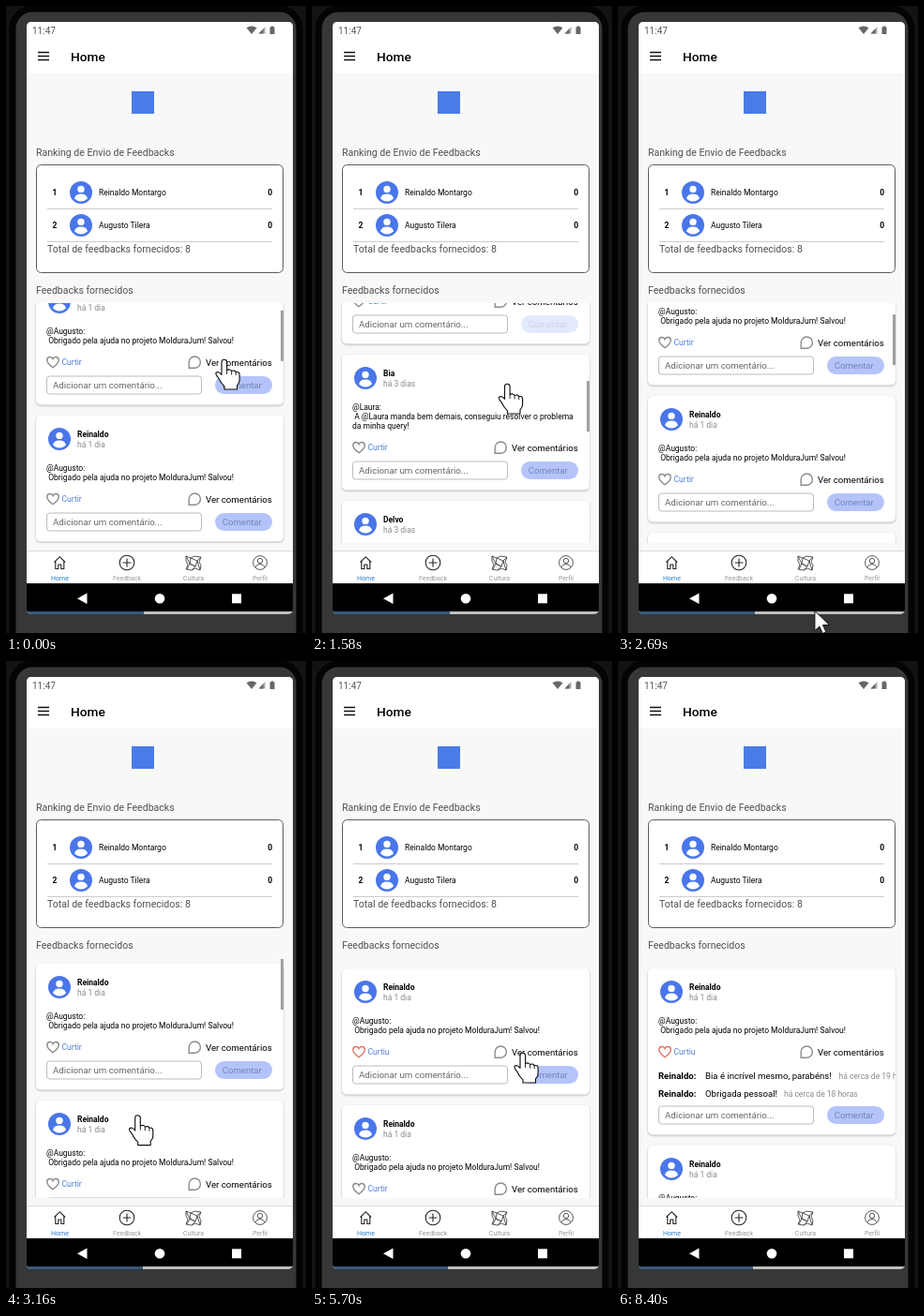
Write an HTML page that moves like this. It is 320 px wide and 669 px high and loops after 8480 ms.

```html
<!DOCTYPE html>
<html lang="pt-BR">
<head>
<meta charset="utf-8">
<title>Feedbacks</title>
<style>
  html, body { margin: 0; width: 100%; height: 100%; overflow: hidden; background: #121313; }
  svg { display: block; width: 100vw; height: 100vh; }
  text { font: 8.5px Roboto, sans-serif; fill: #000; }
  .title { font-size: 13.7px; font-weight: 500; }
  .section { font-size: 10.55px; fill: #505050; }
  .bold { font-weight: 700; }
  .when { fill: #8a8a8a; }
  .like { font-size: 8.6px; fill: #4f7fd8; }
  .field { font-size: 9.7px; fill: #666; }
  .send text { font-size: 9.6px; fill: #7083b8; }
  .show { font-size: 9.67px; }
  .reply { font-size: 9.6px; }
  .tab { font-size: 7px; fill: #999; text-anchor: middle; }
  .line { fill: none; stroke: #222; stroke-width: 1.1; }
  .thin { stroke: #444; stroke-width: .9; }
  .soft { fill: none; stroke: #8c8c8c; stroke-width: 1.4; }
  .card { fill: #fff; filter: drop-shadow(0 1.5px .8px #0004); }
</style>
</head>
<body>
<svg viewBox="0 0 320 669" preserveAspectRatio="none">
  <defs>
    <clipPath id="screenClip"><rect x="22" y="17" width="284" height="632" rx="5"/></clipPath>
    <clipPath id="listClip"><rect x="30" y="317" width="267" height="256"/></clipPath>
    <clipPath id="cardClip"><rect x="32" width="264" height="200"/></clipPath>
    <g id="avatar">
      <circle r="12" fill="#4a76ea"/>
      <circle cy="-3.6" r="3.7" fill="#fff"/>
      <path d="M-7 6.4Q-6 1.6 0 1.6T7 6.4Q4 9.4 0 9.4T-7 6.4z" fill="#fff"/>
    </g>
    <path id="heart" d="M0 5.8C-4 2.8-6.2 1-6.2-2A3.2 3.2 0 0 1 0-3.4 3.2 3.2 0 0 1 6.2-2C6.2 1 4 2.8 0 5.8z"/>
  </defs>

  <rect width="320" height="669" fill="#121313"/>
  <rect x="7" y="3" width="306" height="690" rx="21" fill="#363737" stroke="#040404" stroke-width="7"/>

  <g clip-path="url(#screenClip)">
    <rect x="22" y="17" width="285" height="632" fill="#f8f8f8"/>
    <rect x="22" y="17" width="285" height="55" fill="#fff"/>
    <text x="28" y="29.5" style="font-size:10px;fill:#555">11:47</text>
    <g fill="#666">
      <path d="M256.5 23.3q5.5-3.8 11 0l-5.5 6.7z"/>
      <path d="M269.5 29.5h7v-7.5z" fill="#aaa"/>
      <path d="M269.5 29.5h5v-5.3z"/>
      <path d="M281.5 22.5h1.2v-1h2.6v1h1.2v7.5h-5z"/>
    </g>
    <path d="M34 49.5h12M34 53.5h12M34 57.5h12" stroke="#111" stroke-width="1.5"/>
    <text x="69" y="59" class="title">Home</text>
    <rect x="134" y="91" width="24" height="24" fill="#4a7be8"/>

    <text x="32" y="160" class="section">Ranking de Envio de Feedbacks</text>
    <rect x="32.5" y="169.5" width="263" height="115" rx="5" fill="#fff" stroke="#5c5c5c"/>
    <g id="ranking"></g>
    <text x="44" y="263" class="section">Total de feedbacks fornecidos: 8</text>
    <text x="32" y="307" class="section">Feedbacks fornecidos</text>

    <g clip-path="url(#listClip)">
      <g id="list"></g>
      <rect id="thumb" x="293" width="3" height="54" fill="#a0a0a0"/>
    </g>

    <rect x="22" y="581" width="285" height="35" fill="#fff"/>
    <path d="M22 581.5h285" stroke="#ddd"/>
    <path class="line" d="M51.5 593.5l5.8-5.8 5.8 5.8M52.8 592.5v8h3v-4.5h3v4.5h3v-8"/>
    <g class="line">
      <circle cx="129" cy="594" r="7.8"/>
      <path d="M124.6 594h8.8M129 589.6v8.8"/>
    </g>
    <g class="line thin" transform="translate(200 594)">
      <path d="M-8-7l5 2 4-2 7 1-2 5 2 4-1 5-5-2-4 2-6-1 2-5-2-4zM-3-5l7 3-2 6-6-3zM-8-7l4 8-3 6M8-6l-4 4 3 10M-4 1l6 3-4 4"/>
    </g>
    <g class="line thin">
      <circle cx="271" cy="594" r="7.4"/>
      <circle cx="271" cy="592" r="2.7"/>
      <path d="M266 599q1-3.4 5-3.4t5 3.4"/>
    </g>
    <text x="57.5" y="613" class="tab" style="fill:#2a7fc8">Home</text>
    <text x="129" y="613" class="tab">Feedback</text>
    <text x="200" y="613" class="tab">Cultura</text>
    <text x="271" y="613" class="tab">Perfil</text>

    <rect x="22" y="616" width="285" height="33" fill="#000"/>
    <path d="M76 632.3l10.5-5.8v11.6z" fill="#fff"/>
    <circle cx="164" cy="632.3" r="5.3" fill="#fff"/>
    <rect x="241" y="627.3" width="10" height="10" fill="#fff"/>
    <rect x="22" y="646" width="285" height="3" fill="#bcc0be"/>
    <rect id="progress" x="22" y="646" height="3" fill="#38587a"/>
  </g>

  <g id="pointer" stroke="#111" stroke-linejoin="round" fill="#fff">
    <g id="hand" stroke-width="1.15">
      <path d="M-3 3a2.8 2.8 0 0 1 5.6 0v8.5q4-1.6 5 1 3.6-1.4 4.6 1.2 3.6-1 3.9 2.6v6q0 3-2.6 5.5v4.2h-13.5v-3.1q-4-4-6-8.5-4-4.6-3-6 2.4-2.4 6 2z"/>
      <path d="M2.6 11.5v4.5M7.6 12.5v4M12.2 13.7v3.3" fill="none" stroke-width=".9"/>
    </g>
    <path id="arrow" d="M0 0v21l5-4.5 3.4 7.5 3.6-1.6-3.4-7.4h7z"/>
  </g>
</svg>

<script>
const LOOP = 8480, STEP = LOOP / 107;
const LIST_TOP = 317, FIRST_CARD = 328, THUMB_RATIO = 0.211, REPLIES_HEIGHT = 43;
const LIKED_AT = 4520, OPENED_AT = 6650, HAND_GONE_AT = 7290;
const $ = id => document.getElementById(id);

const author = 'Reinaldo';
const thanks = ['Obrigado pela ajuda no projeto MolduraJum! Salvou!'];
const posts = [
  { name: author, when: 'há 1 dia', to: 'Augusto', lines: thanks },
  { name: author, when: 'há 1 dia', to: 'Augusto', lines: thanks },
  { name: 'Lúcia', when: 'há 2 dias', to: 'Leonardo', lines: ['@Leonardo, representa nossa cultura demais!'] },
  { name: 'Bia', when: 'há 3 dias', to: 'Laura',
    lines: ['A @Laura manda bem demais, conseguiu resolver o problema', 'da minha query!'] },
  { name: 'Delvo', when: 'há 3 dias', to: 'Lúcia', lines: ['Obrigado pela parceria!'] }
];

const text = (x, y, cls, content) => `<text x="${x}" y="${y}" class="${cls}">${content}</text>`;

const rankRow = (place, name, y) => `
  ${text(49.5, y + 3, 'bold', place)}
  <use href="#avatar" x="80" y="${y}"/>
  ${text(99, y + 3, '', name)}
  ${text(279.3, y + 3, 'bold', 0)}
  <path d="M44 ${y + 17.5}h240" stroke="#ccc"/>`;

const reply = (y, message, x, when) =>
  text(43, y, 'reply bold', author + ':') + text(93, y, 'reply', message) + text(x, y, 'when', when);

const postCard = ({ name, when, to, lines }) => {
  const extra = (lines.length - 1) * 10;
  return `<g class="post">
    <rect class="card" x="32" width="264" height="${134.5 + extra}" rx="5"/>
    <use href="#avatar" x="57" y="25"/>
    ${text(76, 23, 'bold', name)}
    ${text(76, 34, 'when', when)}
    ${text(43, 59, '', `@${to}:`)}
    ${lines.map((line, i) => text(i ? 43 : 45.2, 69 + i * 10, '', line)).join('')}
    <g transform="translate(0 ${extra})">
      <use href="#heart" class="soft heart" x="50" y="89"/>
      ${text(59.5, 92.3, 'like', 'Curtir')}
      <g class="toggle">
        <path class="soft" d="M195.2 95.2V89a6.1 6.1 0 1 1 6.1 6.2z"/>
        ${text(213, 92.7, 'show', 'Ver comentários')}
      </g>
      <g class="replies" clip-path="url(#cardClip)" visibility="hidden">
        ${reply(117.5, 'Bia é incrível mesmo, parabéns!', 235.5, 'há cerca de 19 horas')}
        ${reply(136.5, 'Obrigada pessoal!', 177, 'há cerca de 18 horas')}
      </g>
      <g class="form">
        <rect x="43.5" y="104" width="165" height="19" rx="3" fill="#fff" stroke="#bbb"/>
        ${text(50, 117, 'field', 'Adicionar um comentário...')}
        <g class="send">
          <rect x="223" y="104" width="61" height="19" rx="9.5" fill="#b4c4fb"/>
          ${text(230.7, 117, '', 'Comentar')}
        </g>
      </g>
    </g>
  </g>`;
};

$('ranking').innerHTML = rankRow(1, 'Reinaldo Montargo', 199) + rankRow(2, 'Augusto Tilera', 234);
$('list').innerHTML = posts.map(postCard).join('');

const cards = [...document.querySelectorAll('.post')];
const part = (index, selector) => cards[index].querySelector(selector);
const first = {
  card: part(0, '.card'), heart: part(0, '.heart'), like: part(0, '.like'),
  toggle: part(0, '.toggle'), replies: part(0, '.replies'), form: part(0, '.form')
};
const pressedButton = part(2, '.send');

// Tracks hold [time, value, ...] keys, joined by straight lines.
const scrollTrack = [[0, 37], [160, 150], [280, 245], [396, 295], [560, 309], [710, 312], [1190, 312],
  [1350, 352], [1585, 394], [1650, 402], [1810, 408], [2220, 408], [2450, 205], [2570, 110],
  [2694, 58], [2850, 24], [3100, 4], [3250, 0]];
const pointerTrack = [[0, 233, 377], [160, 236, 322], [240, 233, 350], [396, 224, 460], [710, 223, 478],
  [870, 223, 476], [1190, 229, 424], [1360, 222, 299], [1440, 216, 320], [1585, 208.5, 403], [1810, 206, 412],
  [1980, 206, 400], [2220, 212, 330], [2450, 213, 535], [2610, 212, 625], [2694, 210, 646],
  [2770, 200, 580], [3000, 160, 500], [3400, 75, 432], [3630, 53, 418], [3950, 51, 414], [5100, 51, 414],
  [5300, 110, 430], [5540, 210, 424], [5700, 225, 418]];
const thumbFade = [[3250, 1], [3600, 0]];
const buttonFade = [[1200, 1], [1280, 0.35], [1585, 0.35], [1810, 1]];
const toggleFade = [[6480, 1], [6560, 0.25], [6700, 0.25], [6960, 1]];

function at(track, time) {
  const next = track.findIndex(key => key[0] > time);
  if (next < 0) return track[track.length - 1].slice(1);
  if (next === 0) return track[0].slice(1);
  const a = track[next - 1], b = track[next];
  const k = (time - a[0]) / (b[0] - a[0]);
  return a.slice(1).map((value, i) => value + (b[i + 1] - value) * k);
}

const move = (node, x, y) => node.setAttribute('transform', `translate(${x} ${y})`);
const show = (node, visible) => node.setAttribute('visibility', visible ? 'visible' : 'hidden');

function draw(time) {
  const [scroll] = at(scrollTrack, time);
  const [x, y] = at(pointerTrack, time);
  const liked = time >= LIKED_AT, opened = time >= OPENED_AT;
  const shift = opened ? REPLIES_HEIGHT : 0;

  let top = FIRST_CARD - Math.round(scroll);
  cards.forEach((card, i) => {
    move(card, 0, top);
    top += 146 + (posts[i].lines.length - 1) * 10 + (i ? 0 : shift);
  });

  first.card.setAttribute('height', 134.5 + shift);
  move(first.form, 0, shift);
  show(first.replies, opened);
  first.like.textContent = liked ? 'Curtiu' : 'Curtir';
  first.heart.style.stroke = liked ? '#e5766a' : '';
  first.toggle.setAttribute('opacity', at(toggleFade, time)[0]);
  pressedButton.setAttribute('opacity', at(buttonFade, time)[0]);

  $('thumb').setAttribute('y', LIST_TOP + scroll * THUMB_RATIO);
  $('thumb').setAttribute('opacity', at(thumbFade, time)[0]);
  $('progress').setAttribute('width', 125 - [1730, 4500, 8180].filter(t => time >= t).length);

  const overApp = y < 616;
  move($('pointer'), x, y);
  show($('hand'), overApp && time < HAND_GONE_AT);
  show($('arrow'), !overApp);
}

const start = performance.now();
function tick() {
  const elapsed = (performance.now() - start) % LOOP;
  draw(Math.floor((elapsed + 8) / STEP) % 107 * STEP);
  requestAnimationFrame(tick);
}
tick();
</script>
</body>
</html>
```
